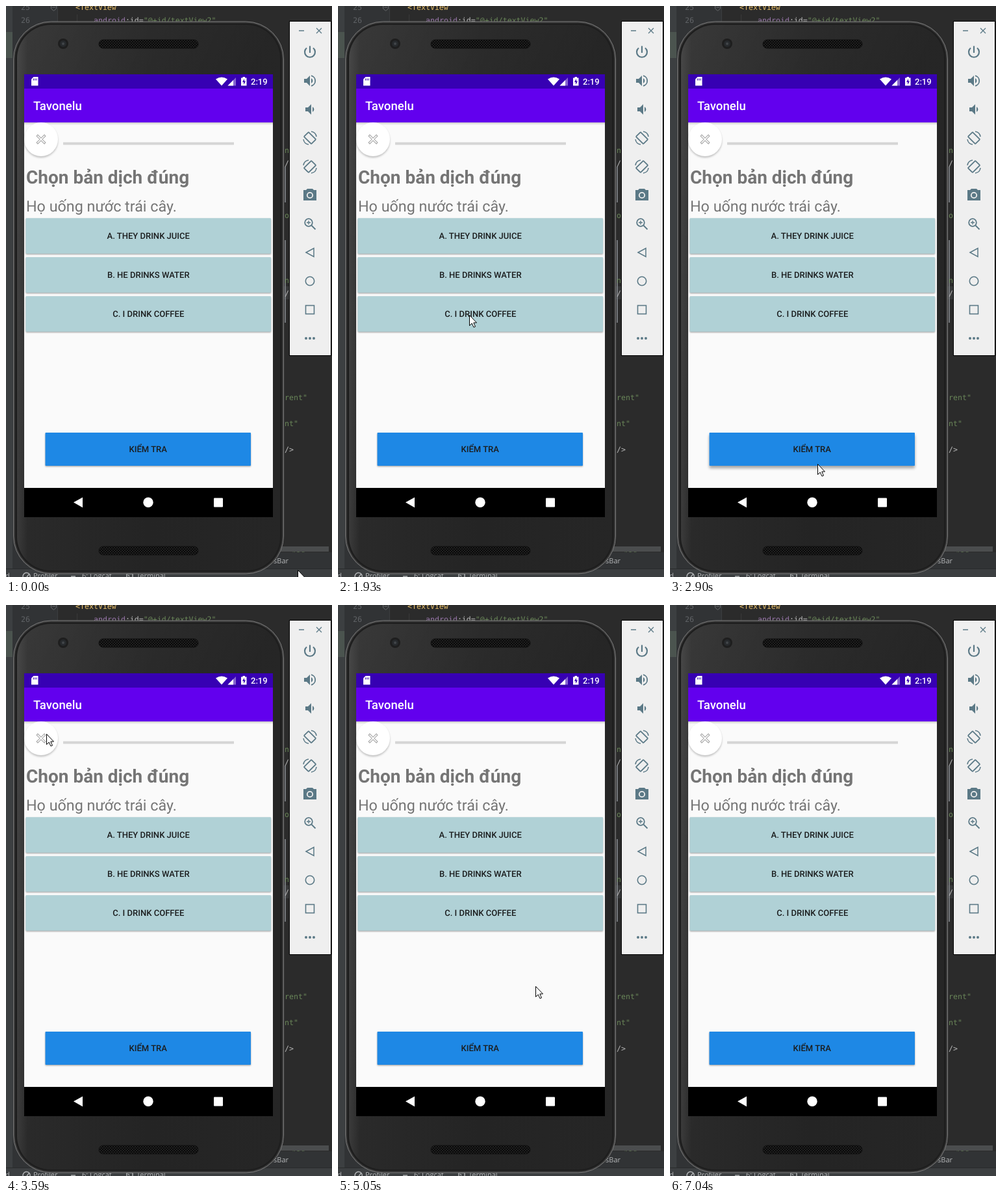
These frames come from a looping animation (502x878 px, 7570 ms). An HTML page:

```html
<!DOCTYPE html>
<html lang="vi">
<head>
<meta charset="utf-8">
<title>Quiz screen</title>
<style>
  html, body { margin: 0; width: 100%; height: 100%; overflow: hidden; background: #2b2b2b; }
  svg { display: block; width: 502px; height: 878px; }
  text { font-family: Roboto, sans-serif; white-space: pre; text-rendering: geometricPrecision; }
  .code text { font: 11.6px "DejaVu Sans Mono", monospace; }
  .ide text { font: 11px "Open Sans", "Noto Sans", sans-serif; fill: #b4b6b8; }
  .caps { font-size: 13.05px; font-weight: 500; text-anchor: middle; fill: #1b1d1e; }
  .icon { fill: none; stroke: #5b7986; stroke-width: 1.8; }
  .icon .solid { fill: #5b7986; stroke: none; }
</style>
</head>
<body>
<svg viewBox="0 0 502 878">
  <defs>
    <linearGradient id="shell" x2="1">
      <stop offset="0" stop-color="#3a3a3a"/><stop offset=".04" stop-color="#2a2a2a"/>
      <stop offset=".5" stop-color="#242424"/><stop offset="1" stop-color="#262626"/>
    </linearGradient>
    <linearGradient id="sheen" x2="1" y2="1">
      <stop offset="0" stop-color="#fff" stop-opacity=".07"/>
      <stop offset=".5" stop-color="#fff" stop-opacity="0"/>
    </linearGradient>
    <linearGradient id="barShade" x2="0" y2="1">
      <stop offset="0" stop-opacity=".2"/><stop offset="1" stop-opacity="0"/>
    </linearGradient>
    <pattern id="mesh" width="4" height="4" patternUnits="userSpaceOnUse">
      <rect width="4" height="4" fill="#202020"/>
      <circle cx="1" cy="1" r="1.1" fill="#050505"/><circle cx="3" cy="3" r="1.1" fill="#050505"/>
    </pattern>
  </defs>

  <!-- editor -->
  <rect width="502" height="878" fill="#2b2b2b"/>
  <rect x="10" width="69" height="878" fill="#313335"/>
  <path d="M79.5 0V878" stroke="#3b3d3f"/>
  <rect width="10" height="878" fill="#3c3f41"/>
  <rect y="40" width="10" height="40" fill="#4b544f"/>
  <path d="M109.5 13V28" stroke="#3a3a3a"/>
  <path d="M69.5 -2V4L73.5 7.5 77.5 4V-2M71 2H76" fill="none" stroke="#66696b"/>
  <rect x="425" y="431" width="12" height="20" fill="#38393a"/>
  <path d="M430 247V302M430 360V487" stroke="#73767a" stroke-width="2"/>
  <g class="code" id="code"></g>
  <rect x="400" y="831" width="97" height="8" fill="#4b4d4e"/>
  <rect x="400" y="840" width="102" height="26" fill="#313335"/>
  <rect y="866" width="502" height="12" fill="#3c3f41"/>
  <path d="M0 865.5H502" stroke="#292b2c"/>
  <g class="ide">
    <text x="412" y="857">sBar</text>
    <text x="-1" y="880">d</text><text x="42" y="880">Profiler</text>
    <text x="117" y="880">6: Logcat</text><text x="201" y="880">Terminal</text>
    <path d="M27 880A5.5 5.5 0 1 1 37 878M32 878L36 873M100 877H107M186 873H195V880H186ZM188 875L190 877"
      fill="none" stroke="#afb1b3" stroke-width="1.5"/>
  </g>

  <!-- phone -->
  <rect x="11.5" y="24" width="416" height="849" rx="58" fill="#3a3a3a" stroke="#7c7c7c"/>
  <rect x="14" y="26.5" width="411" height="844" rx="55" fill="#1e1e1e"/>
  <rect x="17" y="29" width="405" height="839" rx="52" fill="url(#shell)"/>
  <rect x="17" y="29" width="405" height="839" rx="52" fill="url(#sheen)"/>
  <circle cx="88" cy="58" r="8" fill="#1e1e1e"/>
  <circle cx="88" cy="58" r="5" fill="#272a2d"/><circle cx="88" cy="58" r="2" fill="#42464a"/>
  <rect x="143" y="52" width="153" height="13" rx="6.5" fill="url(#mesh)" stroke="#111"/>
  <rect x="143" y="831" width="153" height="13" rx="6.5" fill="url(#mesh)" stroke="#111"/>

  <!-- screen -->
  <rect x="28" y="105" width="383" height="681" fill="#fafafa"/>
  <rect x="28" y="179" width="383" height="4" fill="url(#barShade)"/>
  <rect x="28" y="105" width="383" height="22" fill="#3700b3"/>
  <rect x="28" y="127" width="383" height="52" fill="#6200ee"/>
  <g fill="#fff">
    <path d="M42.5 109H49.5V122.5H39V112.5Z"/>
    <path d="M42.5 111.5V114.500M44.8 111.5V114.500M47 111.5V114.500" stroke="#3700b3"/>
    <path d="M323 112.5Q332 106.5 341 112.5L332 122.5Z"/>
    <path d="M341.5 122.5L354 110V122.5Z" opacity=".4"/><path d="M341.5 122.5L350 114V122.5Z"/>
    <path d="M362 110.5H364.5V109H368V110.5H370.5V122.5H362Z"/>
    <path d="M367 112L364 117H366V121L369 115.5H367Z" fill="#3700b3"/>
    <text x="377" y="121" font-size="13.05" font-weight="500">2:19</text>
    <text x="42" y="160" font-size="18.65" font-weight="500">Tavonelu</text>
  </g>
  <path d="M88 211.5H351" stroke="#d5d5d5" stroke-width="4"/>
  <g fill="#757575">
    <text x="31" y="272.5" font-size="27.97" font-weight="700">Chọn bản dịch đúng</text>
    <text x="31" y="316" font-size="23.3">Họ uống nước trái cây.</text>
  </g>
  <g id="buttons"></g>
  <circle id="fabShade" cx="54" cy="205" r="26"/>
  <circle id="fab" cx="54" cy="205" r="26"/>
  <path d="M-1.3 -8.5H1.3V-1.3H8.5V1.3H1.3V8.5H-1.3V1.3H-8.5V-1.3H-1.3Z" fill="none" stroke="#a2a2a2"
    transform="translate(54 205) rotate(45)"/>
  <rect x="28" y="741" width="383" height="45"/>
  <g fill="#fff">
    <path d="M104 763.3L118 755.5V771.2Z"/><circle cx="219" cy="763.3" r="7.7"/>
    <rect x="320" y="756.5" width="14" height="14" rx="1"/>
  </g>

  <!-- emulator controls -->
  <rect x="436.5" y="23.5" width="64" height="514" fill="#efefef" stroke="#000"/>
  <path d="M451 38H459M478 34L486 42M486 34L478 42" stroke="#5b7986" stroke-width="1.3"/>
  <g id="icons"></g>
  <path id="cursor" d="M.5 .5V16.5L4.2 13 7 19 9.5 18 6.8 12H11.5Z" fill="#fff" stroke="#000"/>
</svg>
<script>
const $ = id => document.getElementById(id);
const LOOP = 7570, STEP = 70;

// Editor text on a 20 px line grid
const GREEN = '#6a8759', GREY = '#606366', TAG = '#e8bf6a', PLAIN = '#bababa';
const code = (x, row, color, s) => `<text x="${x}" y="${6 + 20 * row}" fill="${color}">${s}</text>`;
const lineEnds = { 11: 'n', 12: '/', 16: 'o', 21: 'n', 22: '/', 30: 'rent"', 32: 'nt"', 34: '/&gt;' };
$('code').innerHTML = code(23, 0, GREY, '25') + code(23, 1, GREY, '26') +
  code(107, 0, TAG, '&lt;TextView') +
  code(135, 1, GREEN, `<tspan fill="#9876aa">android</tspan><tspan fill="${PLAIN}">:id=</tspan>"@+id/textView2"`) +
  code(440, 42, GREEN, 'nt"') +
  Object.entries(lineEnds).map(([row, s]) => code(429, row, s.includes('/') ? PLAIN : GREEN, s)).join('');

// Side panel icons, each drawn around its own centre
const speaker = '<path class="solid" d="M-9 -3H-5L0 -8V8L-5 3H-9ZM2 -4A4.5 4.5 0 0 1 2 4Z"/>';
const turn = '<rect x="-8" y="-5" width="16" height="10" rx="1" transform="rotate(45)"/>' +
  '<path d="M2 -10Q9 -9 10 -2M-2 10Q-9 9 -10 2" stroke-width="1.5"/>';
const icons = [
  '<path d="M0 -9.5V1M-5 -6.5A8 8 0 1 0 5 -6.5" stroke-width="2.2"/>',
  speaker + '<path d="M2 -7.8A8 8 0 0 1 2 7.8"/>',
  `<g transform="translate(2)">${speaker}</g>`,
  turn,
  `<g transform="scale(-1 1)">${turn}</g>`,
  '<path class="solid" d="M-10 -8H-6L-4 -10H4L6 -8H10V8H-10Z"/><circle r="4.2" stroke="#efefef"/>',
  '<circle cx="-2" cy="-2" r="5.8"/><path d="M2.5 2.5L8.5 8.5"/><path d="M-5 -2H1M-2 -5V1" stroke-width="1.3"/>',
  '<path d="M-6 0L6 -6.5V6.5Z" stroke-width="1.5"/>',
  '<circle r="6.7" stroke-width="1.6"/>',
  '<rect x="-6.5" y="-6.5" width="13" height="13" stroke-width="1.6"/>',
  '<path d="M-6 0H7" stroke-width="4" stroke-linecap="round" stroke-dasharray="0 6"/>'
];
$('icons').innerHTML = icons.map((body, i) =>
  `<g class="icon" transform="translate(468 ${71 + 44 * i})">${body}</g>`).join('');

const answers = ['A. THEY DRINK JUICE', 'B. HE DRINKS WATER', 'C. I DRINK COFFEE'];
const buttons = answers.map((label, i) =>
  ({ label, x: 30.5, y: 326.3 + 60 * i, w: 377.5, h: 54.5, fill: '#b0d1d6', pressAt: 780 + 610 * i }));
buttons.push({ label: 'KIỂM TRA', x: 60.5, y: 656, w: 316.5, h: 51, fill: '#1e88e5', pressAt: 2730 });
$('buttons').innerHTML = buttons.map(({ x, y, w, h, fill, label }) => {
  const box = `x="${x}" y="${y}" width="${w}" height="${h}" rx="1"`;
  return `<g><rect class="shade" ${box}/><rect ${box} fill="${fill}"/>
    <text class="caps" x="${x + w / 2}" y="${y + h / 2 + 4.4}">${label}</text></g>`;
}).join('');
const shades = document.querySelectorAll('.shade');

// Pointer strokes: quadratic curves, each starting where the last one ended
const pointerStart = [449, 867];
const strokes = [
  { from: 70, to: 630, bend: [-3, 124], end: [172, 348] },
  { from: 1180, to: 1790, bend: [180, 410], end: [202, 475] },
  { from: 2200, to: 2660, bend: [203, 600], end: [227, 704] },
  { from: 2900, to: 3450, bend: [60, 50], end: [62, 198] },
  { from: 3950, to: 4210, bend: [75, 215], end: [106, 262] },
  { from: 4280, to: 4900, bend: [-74, -7], end: [304, 586] },
  { from: 5050, to: 5750, bend: [582, 1118], end: [203, 523] },
  { from: 5840, to: 6230, bend: [447, 420], end: [262, 640] },
  { from: 6480, to: 7040, bend: [320, 492], end: [451, 868] }
];

const clamp = v => Math.max(0, Math.min(1, v));
const snap = t => Math.floor(t / STEP) * STEP;

function pointerAt(t) {
  let pos = pointerStart;
  for (const { from, to, bend, end } of strokes) {
    if (t < from) break;
    const k = t >= to ? 1 : snap(t - from) / (to - from);
    pos = pos.map((p, i) => (1 - k) ** 2 * p + 2 * k * (1 - k) * bend[i] + k * k * end[i]);
  }
  return pos.map(Math.round);
}

function shadow(el, raised, opacity) {
  el.style.filter = `blur(${1 + raised}px)`;
  el.style.transform = `translateY(${1.2 + 2.5 * raised}px)`;
  el.style.opacity = opacity;
}

function draw(t) {
  buttons.forEach(({ pressAt }, i) => {
    const since = snap(t - pressAt);
    shadow(shades[i], Math.min(clamp(since / STEP), clamp((280 - since) / STEP)), 0.34);
  });
  const held = t >= 3650 && t < 4280 ? clamp((t - 3650) / 200) : 0;
  $('fab').setAttribute('fill', `hsl(0 0% ${100 - 7 * held}%)`);
  shadow($('fabShade'), 0.4 + held * 0.4, 0.22);
  $('cursor').setAttribute('transform', `translate(${pointerAt(t)})`);
  $('cursor').style.display = t >= 7040 ? 'none' : '';
}

const start = performance.now();
function tick() {
  draw((performance.now() - start) % LOOP);
  requestAnimationFrame(tick);
}
tick();
</script>
</body>
</html>
```
